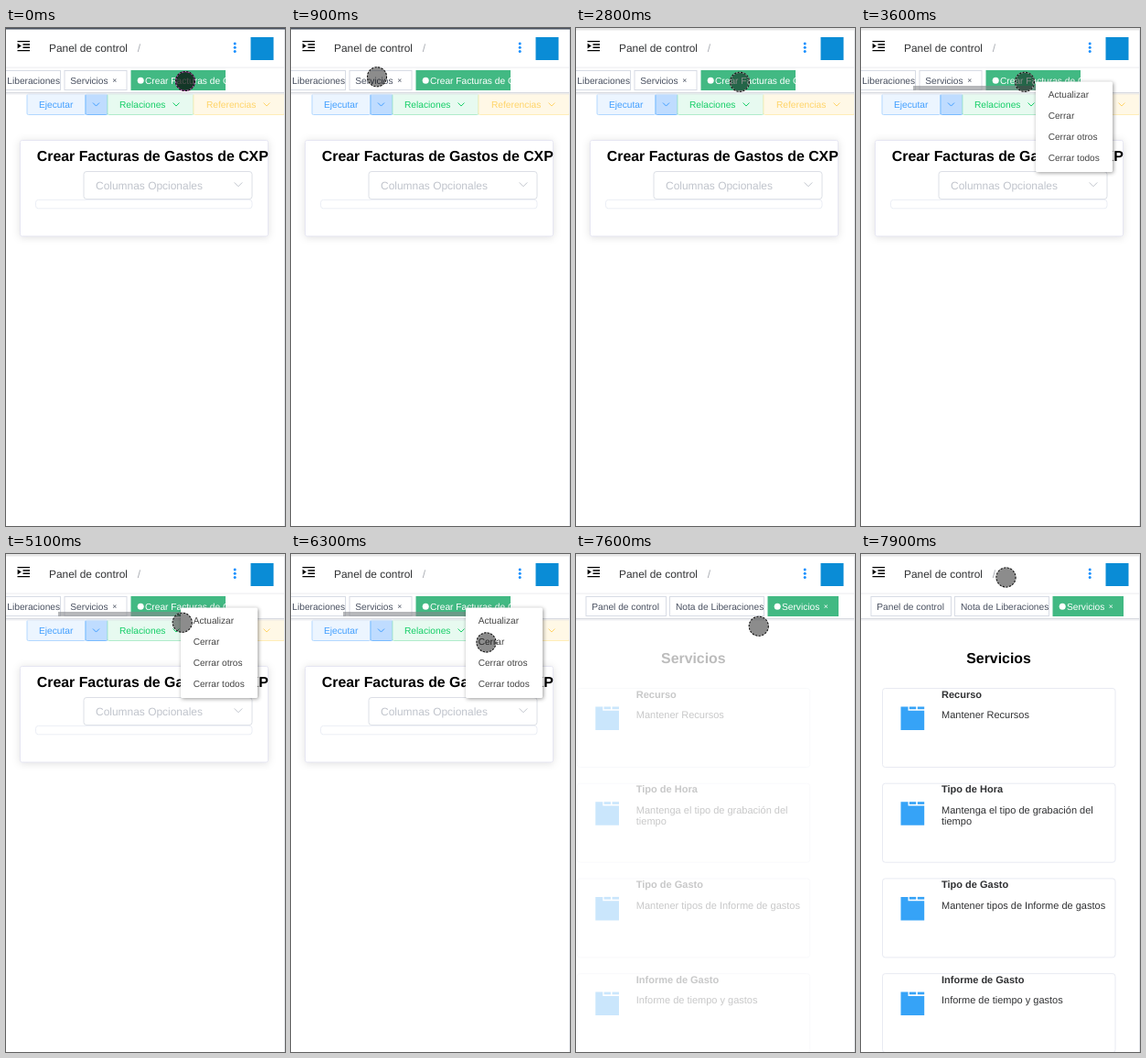
These frames come from a looping animation (305 px wide and 543 px high, 8 s). An HTML page:

```html
<!DOCTYPE html>
<html lang="es">
<head>
<meta charset="utf-8">
<title>Panel de control</title>
<style>
html, body { margin: 0; width: 100%; height: 100%; overflow: hidden; background: #fff; }
svg { display: block; width: 305px; height: 543px; }
text { font-family: "Liberation Sans", Arial, sans-serif; text-rendering: geometricPrecision; white-space: pre; }
.soft { filter: drop-shadow(0 1px 4px rgba(0,0,0,.12)); }
.menu { filter: drop-shadow(1px 1px 2px rgba(0,0,0,.4)); }
</style>
</head>
<body>
<svg id="stage" viewBox="0 0 305 543" xmlns="http://www.w3.org/2000/svg"></svg>
<script>
const LOOP = 8000, STEP = 100;
const GREEN = '#42b983', BLUE = '#409eff', FOLDER = '#36a3f7', INK = '#303133';

const text = (x, y, s, size, fill, extra = '') =>
  `<text x="${x}" y="${y}" font-size="${size}" fill="${fill}" ${extra}>${s}</text>`;
const bold = (x, y, s, size, fill, extra = '') =>
  text(x, y, s, size, fill, 'font-weight="700" ' + extra);
const box = (x, y, w, h, fill, stroke = 'none', r = 0, extra = '') =>
  `<rect x="${x}" y="${y}" width="${w}" height="${h}" rx="${r}" fill="${fill}" stroke="${stroke}" ${extra}/>`;
const group = (id, body) => `<g id="${id}">${body}</g>`;
const chevron = (x, y, color, s = 3.5) =>
  `<path d="M${x - s} ${y - s / 2}l${s} ${s}l${s} ${-s}" fill="none" stroke="${color}"/>`;
const clip = (id, x, y, w, h) =>
  `<clipPath id="${id}"><rect x="${x}" y="${y}" width="${w}" height="${h}"/></clipPath>`;

// Top bar
const header =
  '<path d="M12.5 14.6H26M18.5 18H26M18.5 21.3H26M12.5 24.6H26" stroke="#000" stroke-width="1.4"/>' +
  '<path d="M16.8 19.6L12.6 16.8V22.4Z" fill="#000"/>' +
  [17, 21.3, 25.6].map(y => `<circle cx="250.2" cy="${y}" r="1.5" fill="#1890ff"/>`).join('') +
  text(143.7, 25.6, '/', 11.9, '#a8abb2') +
  box(267.5, 10, 25, 25, '#0a8cd6');
const crumb = text(47, 25.6, 'Panel de control', 11.9, INK);
const oldCrumb =
  text(162, 25.3, 'Panel de control /', 11.9, INK) +
  text(162, 30.5, 'Crear Facturas', 11.9, INK);

// Tab bar
const tab = (x, w) => box(x, 46.5, w, 21, '#fff', '#d8dce5');
const tabText = (x, s, fill = '#495060', extra = '') => text(x, 61.1, s, 10.2, fill, extra);
const activeTab = (x, w, s, extra = '') =>
  box(x, 46, w, 22, GREEN) +
  `<circle cx="${x + 10.7}" cy="57.2" r="3.5" fill="#fff"/>` +
  tabText(x + 15.5, s, '#fff', extra);
const close = (x, fill) => text(x, 60.1, '×', 8.5, fill);

const bar =
  box(0, 43, 304, 28, '#fff') +
  box(0, 42.6, 304, 1, '#ececef') +
  box(0, 70, 304, 1.4, '#d8dae0') + box(0, 71.4, 304, 1.2, '#f1f1f3');
const tabsA =
  tab(-40, 99.5) + tabText(1.3, 'Liberaciones') +
  tab(64, 68) + tabText(70.3, 'Servicios') + close(116.2, '#495060') +
  activeTab(136.5, 103.5, 'Crear Facturas de Gastos', 'clip-path="url(#tabClip)"');
const tabsB =
  tab(11, 87.5) + tabText(17.3, 'Panel de control') +
  tab(102.5, 103) + tabText(109, 'Nota de Liberaciones') +
  activeTab(209.5, 77.5, 'Servicios') + close(270.8, '#fff');

// Form page
const button = (x, w, s, textX, fill, stroke, color) =>
  box(x, 72, w, 22.5, fill, stroke, 1.5) + text(textX, 86.9, s, 10.2, color);
const form =
  button(23, 64, 'Ejecutar', 36, '#ecf5ff', '#b3d8ff', BLUE) +
  button(87, 24, '', 87, '#bfdcff', '#79bbff', BLUE) + chevron(98.5, 83.3, BLUE) +
  button(111, 94, 'Relaciones', 124, '#e7faf0', '#b0eccb', '#13ce66') + chevron(186, 83.3, '#13ce66') +
  button(205, 99.5, 'Referencias', 219, '#fff8e6', '#ffedb8', '#ffd468') + chevron(285, 83.3, '#ffd468') +
  box(15.5, 122.5, 271, 104.5, '#fff', '#e6e6f2', 2, 'class="soft"') +
  bold(33.8, 145, 'Crear Facturas de Gastos de CXP', 15.86, '#000', 'clip-path="url(#cardClip)"') +
  box(85, 156.5, 184, 30, '#fff', '#dcdfe6', 3) +
  text(98, 176.2, 'Columnas Opcionales', 11.96, '#c0c4cc') + chevron(254, 170.6, '#c0c4cc', 4.3) +
  box(32.5, 187.3, 236.5, 9.5, '#fff', '#ebeef5', 3);

const menu =
  box(191, 58.5, 84, 98.5, '#fff', 'none', 1.5, 'class="menu"') +
  ['Actualizar', 'Cerrar', 'Cerrar otros', 'Cerrar todos']
    .map((s, i) => text(204.7, 76 + i * 23, s, 10.1, '#444')).join('');

// Services page
const services = [
  ['Recurso', 'Mantener Recursos'],
  ['Tipo de Hora', 'Mantenga el tipo de grabación del', 'tiempo'],
  ['Tipo de Gasto', 'Mantener tipos de Informe de gastos'],
  ['Informe de Gasto', 'Informe de tiempo y gastos']
];
const service = ([name, ...lines], i) =>
  `<g transform="translate(0 ${i * 103.7})">` +
  box(23.5, 146.5, 254.5, 86, '#fff', '#e8eaf2', 3) +
  `<path d="M43.5 166.5H51.5V170.8H69.2V192H43.5Z" fill="${FOLDER}"/>` +
  box(52.8, 166.5, 7.4, 2.7, FOLDER) + box(61.8, 166.5, 7.4, 2.7, FOLDER) +
  bold(88, 156.8, name, 11, INK) +
  lines.map((s, n) => text(88, 179.4 + n * 12, s, 11, INK)).join('') + '</g>';
const page = bold(115.3, 119.2, 'Servicios', 15.86, '#000') + services.map(service).join('');

const touch =
  '<circle id="fill" r="11" fill="#000"/>' +
  '<circle id="ring" r="10.5" fill="none"/>' +
  '<circle r="10.5" fill="none" stroke="#111" stroke-width="1.1" stroke-dasharray="2 1.6"/>';

document.getElementById('stage').innerHTML =
  `<defs>${clip('tabClip', 136, 46, 104, 22)}${clip('cardClip', 15, 122, 272, 105)}</defs>` +
  group('page', page) + group('form', form) +
  group('crumb', crumb) + group('oldCrumb', oldCrumb) + header + bar +
  group('tabsA', tabsA) + group('tabsB', tabsB) +
  group('press', box(136, 46, 168, 22, '#000')) +
  group('thumb', box(57, 63, 183, 5, '#85878c')) +
  box(304, 0, 1, 543, '#e2e4e8') +
  group('menu', menu) +
  '<rect id="top" width="305"/>' +
  group('touch', touch);

const el = {};
document.querySelectorAll('#stage [id]').forEach(n => el[n.id] = n);

const ramp = (t, a, b) => Math.min(1, Math.max(0, (t - a) / (b - a)));
const easeOut = k => 1 - (1 - k) ** 4;
const smooth = k => k * k * (3 - 2 * k);

// Each move: start, end, and where the finger arrives
const HOME = [196, 58];
const MOVES = [
  [400, 900, 94, 53.3], [1300, 1500, 177.3, 61.2], [1600, 2000, 179, 58.8],
  [5000, 5200, 206.5, 90.7], [5300, 5600, 212.5, 98.2], [6100, 6300, 213.5, 96.4],
  [7500, 7900, 158.5, 25.5]
];
const finger = t => MOVES.reduce(([x, y], [a, b, toX, toY]) => {
  const k = ramp(t, a, b);
  return [x + (toX - x) * k, y + (toY - y) * k];
}, HOME);

function place(node, opacity, x = 0, y = 0) {
  node.setAttribute('opacity', opacity);
  node.setAttribute('transform', `translate(${x} ${y})`);
}

function draw(ms) {
  const t = Math.floor((ms % LOOP) / STEP) * STEP;
  const pressed = t < 500, light = t >= 2800, switched = t >= 7000;
  const open = t < 6900 ? ramp(t, 3400, 3600) : 0;
  const leave = easeOut(ramp(t, 6900, 7400));
  const enter = smooth(ramp(t, 7450, 7900));

  place(el.touch, 1, ...finger(t));
  el.fill.setAttribute('opacity', pressed ? .7 : .45);
  el.ring.setAttribute('stroke', pressed ? '#d45bc8' : '#b4b4b4');
  place(el.press, .18 * (ramp(t, 2900, 3300) - ramp(t, 3400, 3600)));
  place(el.menu, open);
  place(el.thumb, open * .6);
  place(el.form, 1 - leave, 26 * leave);
  place(el.crumb, switched ? leave : 1, switched ? 15 * (1 - leave) : 0);
  place(el.oldCrumb, switched ? .55 * (1 - leave) : 0);
  place(el.page, enter, -30 * (1 - enter));
  place(el.tabsA, switched ? 0 : 1);
  place(el.tabsB, switched ? 1 : 0);
  el.top.setAttribute('height', light ? 2.5 : 1.5);
  el.top.setAttribute('fill', light ? '#e6e6e6' : '#4a5260');
}

const start = performance.now();
function tick() {
  draw(performance.now() - start);
  requestAnimationFrame(tick);
}
tick();
</script>
</body>
</html>
```
